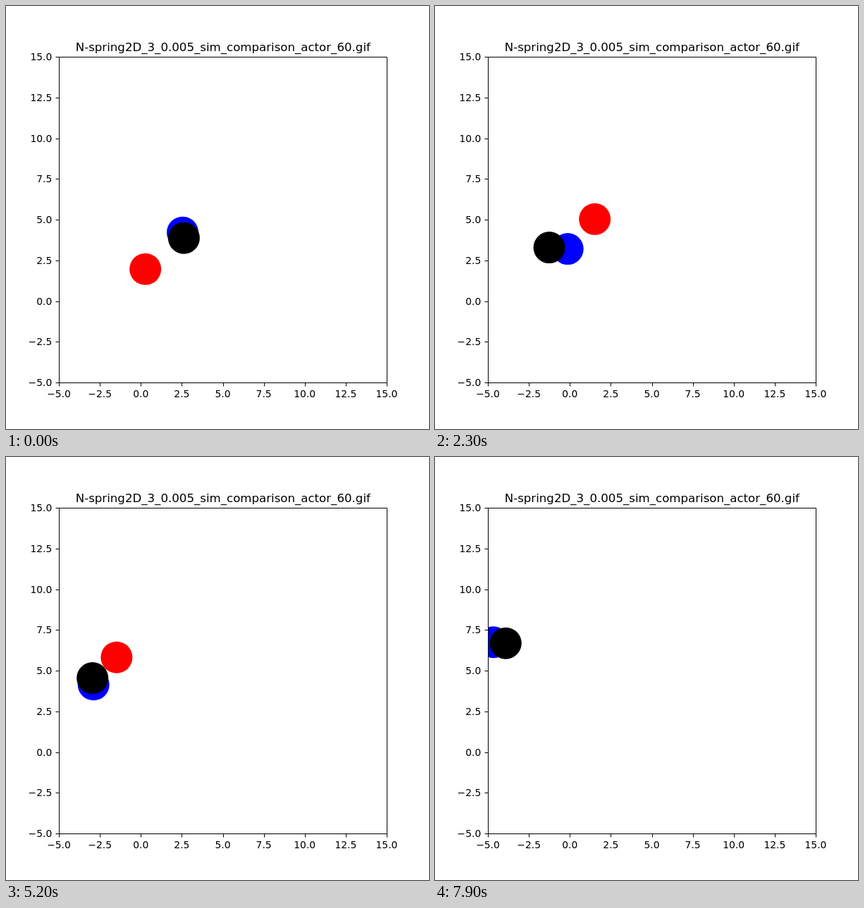
An HTML page for the animation above (8000 ms loop, 600 px wide and 600 px high).

```html
<!DOCTYPE html>
<html>
<head>
<meta charset="utf-8">
<style>
  html, body { margin: 0; width: 100%; height: 100%; overflow: hidden; background: #fff; }
  svg { display: block; width: 600px; height: 600px; }
  text { font: 13.89px "DejaVu Sans", sans-serif; }
  .title { font-size: 16.62px; }
  path { stroke: #000; fill: none; }
</style>
</head>
<body>
<svg viewBox="0 0 600 600">
  <clipPath id="plot"><rect x="75" y="72" width="466" height="463"/></clipPath>
  <g id="balls" clip-path="url(#plot)"></g>
  <path d="M75.5 72.5H540.5V534.5H75.5Z"/>
  <g id="axes"></g>
  <text class="title" x="307.8" y="64" text-anchor="middle">N-spring2D_3_0.005_sim_comparison_actor_60.gif</text>
</svg>
<script>
const LOOP = 8000, STEP = 100;

function add(parent, tag, attrs, text = '') {
  const el = document.createElementNS('http://www.w3.org/2000/svg', tag);
  for (const key in attrs) el.setAttribute(key, attrs[key]);
  el.textContent = text;
  return document.getElementById(parent).appendChild(el);
}

for (let i = 0; i < 9; i++) {
  const label = (i * 2.5 - 5).toFixed(1).replace('-', '\u2212');
  const x = 75 + i * 58.125, y = Math.round(534 - i * 57.75);
  add('axes', 'path', { d: `M${Math.round(x) + .5} 534.5v5M75.5 ${y + .5}h-5` });
  add('axes', 'text', { x, y: 555, 'text-anchor': 'middle' }, label);
  add('axes', 'text', { x: 65.3, y: y + 5, 'text-anchor': 'end' }, label);
}

const [blue, black, red] = ['#00f', '#000', '#f00'].map(fill => add('balls', 'circle', { r: 22.5, fill }));

// Swing of the given size and period (s) that peaks at the given time
const swing = (size, period, peak, t) => size * Math.cos(2 * Math.PI * (t - peak) / period);

// The centre of mass drifts; red and black swing about it and blue balances them
function pose(t) {
  const cx = 233.5 - 17 * t - .389 * t * t;
  const cy = 341.2 - 3.6 * t - .578 * t * t;
  const rx = swing(-37.8, 3.71, .19, t), ry = swing(32.6, 3.71, .11, t);
  const kx = swing(28.5, 3.64, .44, t) - 1.8, ky = swing(-13.7, 3.64, .33, t) - .5;
  place(red, cx + rx, cy + ry);
  place(black, cx + kx, cy + ky);
  place(blue, cx - rx - kx, cy - ry - ky);
}

function place(ball, x, y) {
  ball.setAttribute('cx', x);
  ball.setAttribute('cy', y);
}

const start = performance.now();
function draw() {
  const ms = (performance.now() - start) % LOOP;
  pose(Math.floor(ms / STEP) * STEP / 1000);
  requestAnimationFrame(draw);
}
draw();
</script>
</body>
</html>
```
